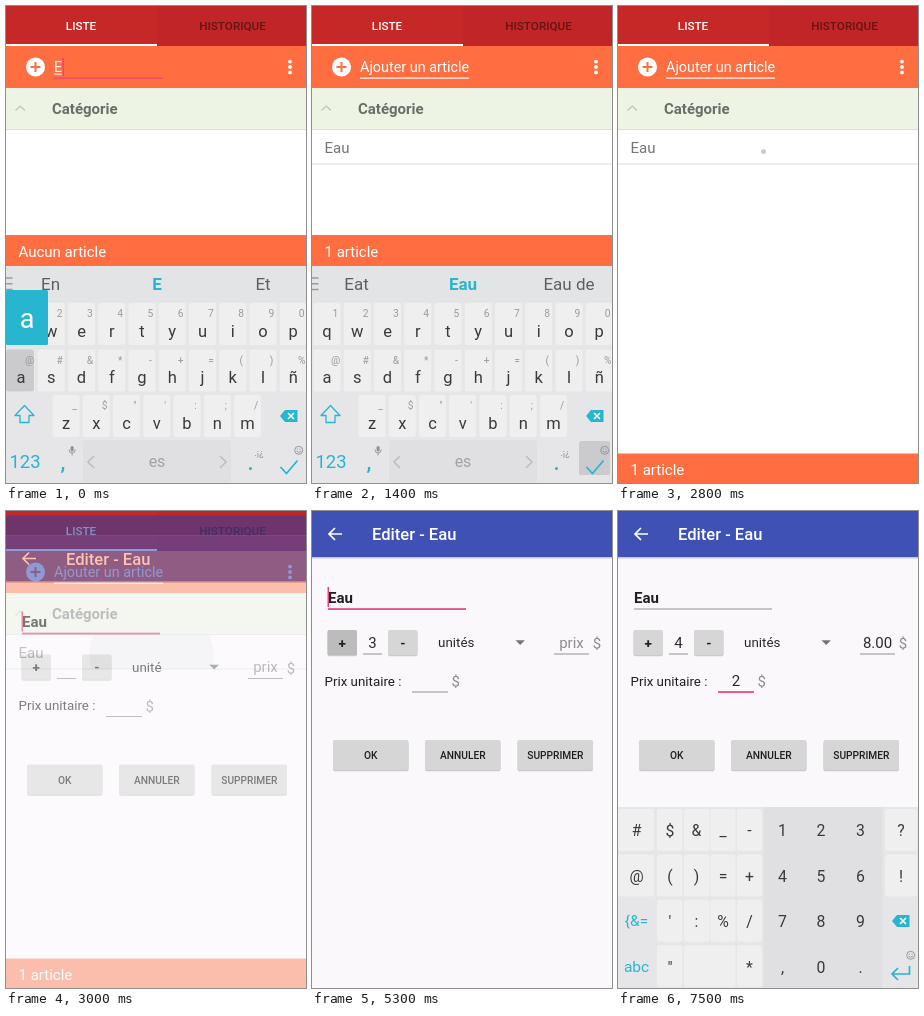
Recreate the animation shown at these times as an HTML page. Size 300 by 477 pixels, loop 8 s.

```html
<!DOCTYPE html>
<html lang="fr">
<head>
<meta charset="utf-8">
<title>Liste</title>
<style>
html, body { margin: 0; width: 100%; height: 100%; overflow: hidden; background: #fff; }
svg { display: block; width: 100vw; height: 100vh; }
text { font-family: Roboto, "Noto Sans", sans-serif; white-space: pre; }
</style>
</head>
<body>
<svg id="stage" viewBox="0 0 300 477"></svg>
<script>
const RED = '#c62828', ORANGE = '#ff6e40', BLUE = '#3f51b5', PINK = '#ec407a', CYAN = '#27b5d0';
const INK = '#3a3a3c', GREY = '#8b8b8d', KEY = '#efeff0';

// Markup helpers
const rect = (x, y, w, h, fill, extra = '') =>
  `<rect x="${x}" y="${y}" width="${w}" height="${h}" fill="${fill}" ${extra}/>`;
const path = (d, stroke, w = 1.5, fill = 'none', extra = '') =>
  `<path d="${d}" stroke="${stroke}" stroke-width="${w}" fill="${fill}" ${extra}/>`;
const text = (x, y, str, size, fill, { mid = true, weight = 400, id = '' } = {}) =>
  `<text id="${id}" x="${x}" y="${y}" font-size="${size}" fill="${fill}" font-weight="${weight}"` +
  ` text-anchor="${mid ? 'middle' : 'start'}">${str.replace(/&/g, '&amp;')}</text>`;
const left = (x, y, str, size, fill, opt = {}) => text(x, y, str, size, fill, { ...opt, mid: false });
const group = (id, body) => `<g id="${id}">${body}</g>`;
const key = (x, y, w, h, fill = KEY) => rect(x, y, w, h, fill, 'rx="2.5"');
const button = (x, y, w, h, id = '') =>
  rect(x, y + 1.2, w, h, '#b9b9bb', 'rx="2" opacity=".75"') +
  rect(x, y, w, h, '#d6d6d7', `rx="1.5" id="${id}"`);
const smiley = (x, y) =>
  `<circle cx="${x}" cy="${y}" r="4" fill="none" stroke="#8f8f91" stroke-width=".9"/>` +
  path(`M${x - 2.2} ${y + .8}q2.2 2.4 4.4 0M${x - 1.8} ${y - 1.2}h1M${x + .8} ${y - 1.2}h1`, '#8f8f91', .9);
const backspace = y =>
  path(`M274 ${y}l5-6h12.5v12h-12.5z`, 'none', 0, CYAN) +
  path(`M282 ${y - 3}l6 6m0-6l-6 6`, '#fff', 1.5);
const popup = (id, x, w, y, ch) =>
  group(id, rect(x, y, w, 55, CYAN, 'rx="1.5"') + text(x + w / 2, y + 38, ch, 27, '#fff'));

function listScreen() {
  return rect(0, 0, 300, 477, '#fff') +
    rect(0, 82, 300, 41, '#edf4e3') + rect(0, 123, 300, 1, '#dcdedb') +
    path('M9.5 104.5l4.7-4.5 4.7 4.5', '#bfc4b9', 1.2) +
    left(46, 108.3, 'Catégorie', 15, '#6a6d68', { weight: 700 }) +
    group('row', left(12.5, 147, 'Eau', 15, '#757575') + rect(0, 157.5, 300, 1, '#dcdcdc')) +
    `<clipPath id="rowClip">${rect(0, 124, 300, 34, '#000')}</clipPath>` +
    '<circle id="ripple" cx="145.5" cy="145.5" r="2.5" clip-path="url(#rowClip)"/>' +
    rect(0, 40, 300, 42, ORANGE) + rect(0, 0, 300, 40, RED) +
    rect(151, 0, 149, 40, '#c22528') + rect(0, 38, 151, 2, '#fff') +
    text(75, 24, 'LISTE', 11.7, '#fff', { weight: 500 }) +
    text(226.5, 24, 'HISTORIQUE', 11.7, '#631414', { weight: 500 }) +
    '<circle cx="29.5" cy="61" r="9.5" fill="#fff"/>' +
    path('M24.5 61h10M29.5 56v10', ORANGE, 2) +
    left(48, 66, '', 14.4, '#fff', { id: 'input' }) +
    rect(48, 67.6, 8, 1, '#fff', 'id="compose"') +
    rect(48, 71.5, 109, 1.2, '#fff', 'id="inputLine"') +
    rect(56.5, 52, 1.5, 18, PINK, 'id="inputCaret"') +
    [55.6, 61, 66.4].map(y => `<circle cx="284" cy="${y}" r="1.9" fill="#fff"/>`).join('') +
    group('status', rect(0, 0, 300, 31, ORANGE) + left(12.5, 21.7, '', 15, '#fff', { id: 'count' }));
}

function letterBoard() {
  let s = rect(0, 260, 300, 217, '#e6e6e8') + rect(0, 260, 300, 36, '#e3e4e5') +
    path('M0 272h6.5M0 277.7h6.5M0 283.4h6.5', '#9a9a9c', 1.5) +
    [44.5, 151, 257].map((x, i) =>
      text(x, 284, '', 17, i === 1 ? CYAN : '#5e5f61', { weight: i === 1 ? 700 : 400, id: 'sug' + i })).join('');
  const rows = [
    ['qwertyuiop', '1234567890', 15, 297],
    ['asdfghjklñ', '@#&*-+=()%', 15, 343.5],
    ['zxcvbnm', '_$"\':;/', 60, 389]
  ];
  for (const [chars, alts, x0, y] of rows) {
    [...chars].forEach((ch, i) => {
      const x = x0 + i * 30.25;
      s += key(x - 13.5, y, 27, 42);
      if (ch === 'a') s += rect(0, y, 28, 42, '#cbcbcd', 'rx="2.5" id="aDown"');
      if (ch === 'u') s += rect(x - 13.5, y, 27, 42, '#cbcbcd', 'rx="2.5" id="uDown"');
      s += text(x, y + 33.5, ch, 16.5, INK) + text(x + 8.5, y + 14.3, alts[i], 10.3, '#9b9b9d');
    });
  }
  s += path('M18.5 399.5l9.5 10h-5v7h-9v-7h-5z', CYAN, 1.3, 'none', 'stroke-linejoin="round"') + backspace(410) +
    key(77, 434, 148, 42, '#e0e0e2') +
    rect(267, 435, 31, 34, '#cbcbcd', 'rx="2.5" id="enterDown"') +
    text(19, 462, '123', 18.5, CYAN) + text(57, 464, ',', 22, CYAN, { weight: 500 }) +
    rect(64.6, 440, 3, 5.5, '#8f8f91', 'rx="1.5"') +
    path('M63 443.5q0 3.5 3.1 3.5t3.1-3.5M66.1 447v2.5', '#8f8f91', .9) +
    path('M88 450l-6 6 6 6M214 450l6 6-6 6', '#bdbdbf', 1.5) +
    text(151, 461, 'es', 16, '#a2a2a4') +
    text(244.5, 464, '.', 22, CYAN, { weight: 500 }) + text(253, 450, '.¡¿', 9.5, '#8f8f91') +
    path('M274.5 461l6 6.5L291.5 454.5', CYAN, 1.7) + smiley(292.7, 444.3);
  return s + popup('aPop', 0, 42, 284, 'a') + popup('uPop', 175.5, 42, 238, 'u');
}

function numberBoard() {
  const cols = [18.5, 52, 78.5, 105, 131.5, 164.5, 203, 242.5, 283];
  const edges = [[0, 36], [39, 25.5], [66, 25.5], [92.5, 25], [119, 25]];
  const rows = ['# $ & _ - 1 2 3 ?', '@ ( ) = + 4 5 6 !', "{&= ' : % / 7 8 9 ~", 'abc " ~ ~ * , 0 . ~'];
  let s = rect(0, 296, 300, 181, '#e6e6e8') + rect(145.5, 296, 119, 181, '#e0e0e2');
  rows.forEach((row, r) => {
    const y = 298 + r * 45.4;
    edges.forEach(([x, w], c) => {
      if (r === 3 && c === 3 || r > 1 && c === 0) return;
      s += key(x, y, r === 3 && c === 2 ? 51.5 : w, 42);
    });
    if (r < 2) s += key(267, y, 32, 42);
    row.split(' ').forEach((ch, c) => {
      const accent = r > 1 && c === 0;
      if (ch !== '~') s += text(cols[c], y + (accent ? 26.5 : 27.3), ch, accent ? 15.5 : 15.8, accent ? CYAN : INK);
    });
  });
  return s + backspace(410) + smiley(292.7, 444.3) +
    path('M291.5 455v8h-17M280 457l-6 6 6 6', CYAN, 1.7);
}

function editScreen() {
  const line = (x, y, w, id = '') => rect(x, y, w, 1, '#929294', `id="${id}"`);
  const big = (x, label) => button(x, 229, 75.5, 30) +
    text(x + 37.8, 248, label, 10.2, '#1f1f20', { weight: 500 });
  return rect(0, 0, 300, 477, '#faf8fb') + rect(0, -20, 300, 20, '#303f9f') +
    rect(0, 46, 300, 1.5, '#c9c8d2') + rect(0, 0, 300, 46, BLUE) +
    path('M30 23H17.5M23 17l-6 6 6 6', '#fff', 1.7) +
    left(60, 29.3, 'Editer - Eau', 16.6, '#fff', { weight: 500 }) +
    left(16, 91.7, 'Eau', 15, '#1f1f20', { weight: 700 }) +
    line(16, 97.5, 138, 'nameLine') + rect(15.5, 76, 1.5, 20, PINK, 'id="nameCaret"') +
    button(15.5, 119, 29.5, 25, 'plus') + button(76, 119, 29.5, 25) +
    text(30.3, 136.5, '+', 13.5, '#1f1f20', { weight: 700 }) +
    text(90.8, 136.5, '-', 13.5, '#1f1f20', { weight: 700 }) +
    text(60.5, 136.8, '', 15, '#2a2a2b', { id: 'qty' }) + line(51, 142.5, 19) +
    left(126, 136.3, '', 13.4, '#2a2a2b', { id: 'unit' }) +
    path('M203.5 129.2h9.4l-4.7 4.8z', 'none', 0, '#757577') +
    text(259.5, 136.8, '', 15, GREY, { id: 'price' }) + line(242, 142.5, 35) +
    text(285, 137, '$', 15, GREY) +
    left(12.5, 174.7, 'Prix unitaire :', 13.35, '#1f1f20') +
    text(118, 175, '', 15, '#2a2a2b', { id: 'each' }) + line(100, 180.5, 36, 'eachLine') +
    rect(118, 159, 1.5, 20, PINK, 'id="eachCaret"') + text(143.6, 175.2, '$', 15, GREY) +
    big(21, 'OK') + big(113, 'ANNULER') + big(205.5, 'SUPPRIMER');
}

document.getElementById('stage').innerHTML =
  listScreen() + group('letters', letterBoard()) +
  group('edit', editScreen() + group('numbers', numberBoard()) + popup('twoPop', 173, 60, 240, '2'));

// Step tables: [start in ms, value]
const STEPS = {
  input: [[0, 'E'], [100, 'Ea'], [300, 'Eau'], [1400, 'Ajouter un article']],
  caretX: [[0, 56.5], [100, 64.5], [300, 72]],
  inputCaret: [[0, 1], [800, 0], [1200, 1], [1400, 0]],
  sug: [[0, ['En', 'E', 'Et']], [100, ['Eat', 'Ea', 'Eau']], [300, ['Eat', 'Eau', 'Eau de']]],
  rippleR: [[0, 0], [2800, 2.5], [3000, 62], [3100, 110]],
  slide: [[0, 24.5], [3100, 8], [3200, 0]],
  fade: [[0, 0], [3000, .58], [3100, .9], [3200, 1]],
  nameCaret: [[0, 1], [3500, 0], [4000, 1], [4500, 0], [5000, 1], [5500, 0]],
  plus: [[0, '#d6d6d7'], [4500, '#c6c6c7'], [5300, '#bcbcbd'], [5400, '#c8c8c9'], [5500, '#bcbcbd'], [5800, '#d6d6d7']],
  qty: [[0, ''], [4500, '1'], [5000, '2'], [5300, '3'], [5500, '4']],
  eachCaret: [[0, 0], [6000, 1], [6500, 0], [7000, 1], [7500, 0]]
};
const at = (name, t) => STEPS[name].reduce((v, [start, next]) => t >= start ? next : v, null);

const el = id => document.getElementById(id);
const show = (id, on) => el(id).setAttribute('display', on ? 'inline' : 'none');
const set = (id, attrs) => { for (const k in attrs) el(id).setAttribute(k, attrs[k]); };
const write = (id, str) => { if (el(id).textContent !== str) el(id).textContent = str; };
const focusLine = (id, on, y) =>
  set(id, { fill: on ? PINK : '#929294', height: on ? 1.7 : 1, y: on ? y - .3 : y });

function draw(t) {
  const typing = t < 1400, board = t < 1500, typed = at('input', t), caretX = at('caretX', t);
  write('input', typed);
  set('inputLine', { fill: typing ? PINK : '#fff' });
  set('compose', { width: caretX - 48.5 });
  show('compose', typing);
  set('inputCaret', { x: caretX });
  show('inputCaret', at('inputCaret', t));
  show('row', !typing);
  write('count', typing ? 'Aucun article' : '1 article');
  set('status', { transform: `translate(0 ${board ? 229 : 447.5})` });
  show('letters', board);
  at('sug', t).forEach((word, i) => write('sug' + i, word));
  for (const id of ['aPop', 'aDown']) show(id, t < 100);
  for (const id of ['uPop', 'uDown']) show(id, t >= 200 && t < 300);
  show('enterDown', t >= 1200);
  set('ripple', { r: at('rippleR', t), fill: '#000', opacity: t < 3000 ? .2 : .06 });

  show('edit', t >= 3000);
  set('edit', { transform: `translate(0 ${at('slide', t)})`, opacity: at('fade', t) });
  show('nameCaret', at('nameCaret', t));
  focusLine('nameLine', t < 5800, 97.5);
  focusLine('eachLine', t >= 5900, 180.5);
  set('plus', { fill: at('plus', t) });
  write('qty', at('qty', t));
  write('unit', t < 5000 ? 'unité' : 'unités');
  const priced = t >= 7000;
  write('each', priced ? '2' : '');
  write('price', priced ? '8.00' : 'prix');
  set('price', { fill: priced ? '#2a2a2b' : GREY });
  set('eachCaret', { x: priced ? 123 : 118 });
  show('eachCaret', at('eachCaret', t));
  show('numbers', t >= 6200);
  show('twoPop', priced && t < 7200);
}

const begin = performance.now();
function tick() {
  draw((performance.now() - begin) % 8000);
  requestAnimationFrame(tick);
}
tick();
</script>
</body>
</html>
```
